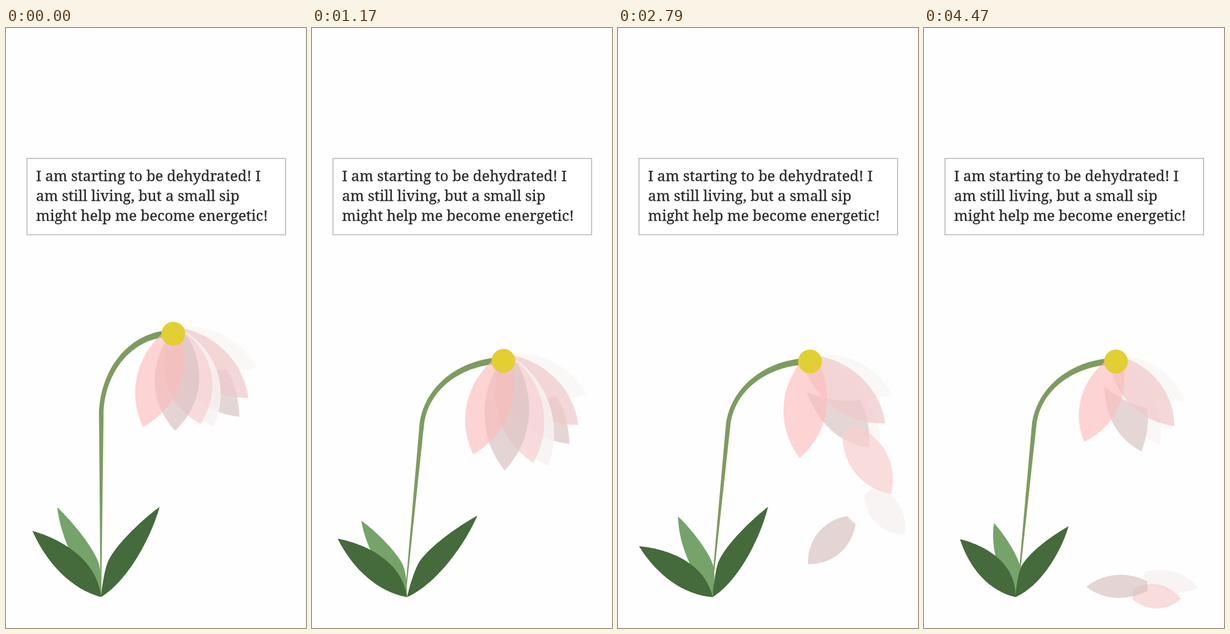
Recreate the animation shown at these times as an HTML page. Size 529 by 1058 pixels, loop 4500 ms.

```html
<!DOCTYPE html>
<html lang="en">
<head>
<meta charset="utf-8">
<title>Thirsty flower</title>
<style>
  html, body { margin: 0; width: 100%; height: 100%; overflow: hidden; background: #fefefe; }
  svg { display: block; width: 100%; height: 100%; }
  text { font: 25.8px "Noto Serif", "DejaVu Serif", serif; fill: #2b2b2b; stroke: #2b2b2b; stroke-width: .35; }
</style>
</head>
<body>
<svg viewBox="0 0 529 1058">
  <rect x="37" y="230" width="456" height="134.5" fill="#fff" stroke="#c4c4c4" stroke-width="2"/>
  <text x="53" y="270">I am starting to be dehydrated! I</text>
  <text x="53" y="305">am still living, but a small sip</text>
  <text x="53" y="340">might help me become energetic!</text>
  <g id="plant"></g>
</svg>
<script>
const LOOP = 4500, SAGGED = 1200, OPENED = 2620;
const plant = document.getElementById('plant');
const parts = [];

// Adds a shape; update(phases) returns the attributes that change
function part(tag, attrs, update) {
  const el = document.createElementNS('http://www.w3.org/2000/svg', tag);
  const set = values => {
    for (const name in values) el.setAttribute(name, values[name]);
  };
  set(attrs);
  plant.appendChild(el);
  parts.push(phases => set(update(phases)));
}

const ramp = (t, from, to) => Math.min(1, Math.max(0, (t - from) / (to - from)));
const mix = (a, b, k) => a.map((v, i) => v + (b[i] - v) * k);
const place = (x, y, angle, sx = 1, sy = 1) =>
  `translate(${x} ${y}) rotate(${angle}) scale(${sx} ${sy})`;

// Blunt base at the origin, sharp tip straight below
function petal(len, w) {
  const h = .4 * w, c = 1.27 * w;
  return `M${h},0C${c},${.3 * len} ${c},${.7 * len} 0,${len}` +
         `C${-c},${.7 * len} ${-c},${.3 * len} ${-h},0Z`;
}

// Leaves point straight up and are turned about the foot of the plant
function leaf(fill, d, turn, shrink) {
  part('path', { fill, d }, p => ({
    transform: place(167.5 - 6.5 * p.wilt, 1003.5, turn(p), 1, 1 - shrink(p))
  }));
}

// Angles of petals count from straight down towards the right
function hanging(fill, d, angle, lift, drop) {
  part('path', { fill, d }, p => {
    const size = 1 - .12 * p.wilt;
    return { transform: place(p.x, p.y, drop * p.wilt - lift * p.open - angle, size, size) };
  });
}

// Poses in flight and on the ground: x, y, angle, length, half-width
function falling(fill, angle, len, width, flight, ground) {
  part('path', { fill }, p => {
    const held = [p.x + 9, p.y + 4, angle, len * (.88 + .12 * p.sag), width];
    const [x, y, turn, l, w] = mix(mix(held, flight, p.open), ground, p.wilt);
    return { d: petal(l, w), transform: place(x, y, -turn) };
  });
}

function stem({ x, y, sag }) {
  const foot = 167 - 3 * sag, top = x - 8;
  const bx = 168 + 26 * sag, by = 684 + 18 * sag;
  const ax = bx + 6 * sag, ay = by - 72 + 10 * sag;
  const cx = x - 82, cy = y + 4;
  return `M${foot - .5},1003L${bx - 4},${by}C${ax - 4},${ay - 1} ${cx - 4},${cy - 4.5} ${top},${y - 6}` +
         `V${y + 5.5}C${cx + 4},${cy + 5} ${ax + 4},${ay + 1} ${bx + 4},${by}L${foot + 1},1003Z`;
}

leaf('#75a36a', 'M0,0C10,-18 19,-39 22,-53C28,-76 13,-144 0,-176C-18,-125 -19,-55 0,0Z',
  p => -26 - 5 * p.sag + 7 * p.open + 8 * p.wilt, p => .11 * p.sag + .12 * p.wilt);

part('path', { fill: '#7d9c60' }, p => ({ d: stem(p) }));

leaf('#456a3c', 'M0,0C45,-53 22,-127 0,-168C-24,-110 -26,-47 0,0Z',
  p => -46 - 4 * p.sag - 6.5 * p.open + 13 * p.wilt, p => .05 * p.sag + .11 * p.wilt);

leaf('#456a3c', 'M0,0C-9,-17 -21,-44 -24,-60C-28,-88 -17,-143 0,-190C17,-135 24,-50 0,0Z',
  p => 33 + 8 * p.sag - 10 * p.open + 6 * p.wilt, p => .18 * p.wilt);

// Petals, back to front
hanging('#faf8f7', petal(158, 31), 68, 1, 9);
hanging('#faf7f6', petal(188, 34), 38.5, 5, 16);
hanging('#e5d6d6', 'M-36,42Q-4,87 34,107Q31,145 0,187Q-58,132 -36,42Z', 38.5, -2, 21);
hanging('rgba(241,200,201,.7)', petal(174, 36), 49.5, 2, 9.5);

falling('rgba(248,243,243,.85)', 21, 195, 41, [448, 801, 35, 100, 27], [387, 968, 78, 98, 18]);
falling('rgba(249,208,208,.72)', 14, 182, 40, [411, 678, 28, 142, 34], [367, 1003, 85, 85, 21]);
falling('rgba(218,196,196,.7)', -2, 190, 39, [413, 856, -40, 109, 27], [394, 986, -90, 108, 20]);

hanging('rgba(254,187,187,.63)', petal(173, 38), -18, 13.5, 17.5);

part('circle', { r: 21, fill: '#e2cf33' }, p => ({ cx: p.x, cy: p.y }));

function draw(now) {
  const t = now % LOOP;
  const sag = ramp(t, 0, SAGGED);
  const phases = {
    sag,
    open: ramp(t, SAGGED, OPENED),
    wilt: ramp(t, OPENED, LOOP),
    x: 295 + 43.5 * sag,
    y: 539 + 49 * sag
  };
  for (const update of parts) update(phases);
}

const start = performance.now();
function tick() {
  draw(performance.now() - start);
  requestAnimationFrame(tick);
}
tick();
</script>
</body>
</html>
```
